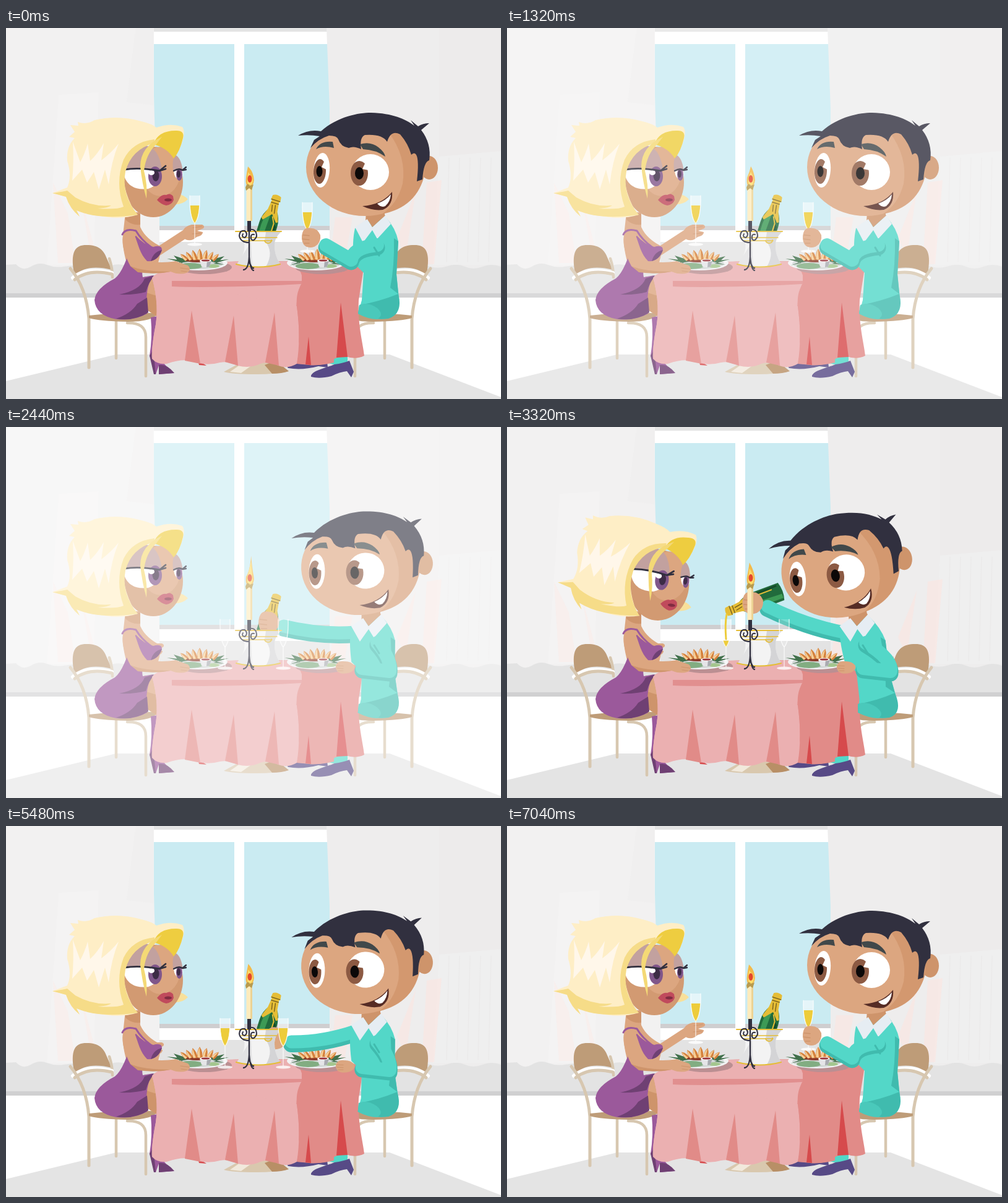
Recreate the animation shown at these times as an HTML page with a canvas. Size 800 px wide and 600 px high, loop 7080 ms.

```html
<!DOCTYPE html>
<html lang="en">
<head>
<meta charset="utf-8">
<title>Dinner for two</title>
<style>
html, body { margin: 0; width: 100%; height: 100%; overflow: hidden; background: #fff; }
canvas { display: block; width: 800px; height: 600px; }
</style>
</head>
<body>
<canvas id="stage" width="800" height="600"></canvas>
<script>
const ctx = document.getElementById('stage').getContext('2d');
const LOOP = 7080, CUT = 2020;
const SKIN = '#dca680', TAN = '#ce946b', TEAL = '#53d7c8', TEAL2 = '#40bbae';
const PLUM = '#9b599b', PLUM2 = '#6f4073', INK = '#31303f', GOLD = '#e5bd36';

const cache = {};
const path = d => cache[d] || (cache[d] = new Path2D(d));
function fill(d, color) { ctx.fillStyle = color; ctx.fill(path(d)); }
function line(d, color, w) {
  ctx.strokeStyle = color; ctx.lineWidth = w;
  ctx.lineCap = ctx.lineJoin = 'round';
  ctx.stroke(path(d));
}
function oval(x, y, rx, ry, color, rot = 0) {
  ctx.fillStyle = color;
  ctx.beginPath(); ctx.ellipse(x, y, rx, ry, rot, 0, 7); ctx.fill();
}
function box(x, y, w, h, color) { ctx.fillStyle = color; ctx.fillRect(x, y, w, h); }
function group(fn) { ctx.save(); fn(); ctx.restore(); }
function pivot(x, y, dx, dy, rot) {
  ctx.translate(x + dx, y + dy); ctx.rotate(rot); ctx.translate(-x, -y);
}
const clamp = v => Math.max(0, Math.min(1, v));
// Eased keyframes: each key is [time, ...values]
function track(t, keys) {
  let i = 0;
  while (i < keys.length - 1 && keys[i + 1][0] <= t) i++;
  const a = keys[i], b = keys[i + 1] || a;
  let k = b === a ? 0 : (t - a[0]) / (b[0] - a[0]);
  k = k * k * (3 - 2 * k);
  return a.slice(1).map((v, n) => v + (b[n + 1] - v) * k);
}

function room() {
  box(0, 0, 800, 600, '#fff');
  box(0, 0, 800, 430, '#e3e3e3');
  box(238, 0, 286, 6, '#e4e4e4');
  box(238, 6, 286, 340, '#fff');
  box(238, 26, 131, 294, '#caebf2');
  box(385, 26, 140, 294, '#caebf2');
  box(238, 320, 131, 7, '#cfced0'); box(385, 320, 140, 7, '#cfced0');
  fill('M0,0H239V110Q242,230 248,300V387Q235,380 222,385T196,385T170,384T144,386T118,384T92,386T66,383T40,386T16,382L0,383Z', '#f2f1f1');
  fill('M518,0H800V386Q785,380 770,386T742,386T714,385T686,386T658,384T630,386T602,385T574,386T546,385L523,386V130Z', '#eeeded');
  fill('M210,0L195,120L238,125V0Z', 'rgba(236,235,235,.35)');
  fill('M85,108L150,104L142,383H66Z', 'rgba(255,255,255,.12)');
  fill('M76,250L100,300L112,380H84Z M120,270L140,383H150Z', 'rgba(255,228,222,.35)');
  fill('M700,0H800V205L700,209Z', 'rgba(228,226,224,.2)');
  fill('M700,208L800,199V383H690Z', 'rgba(240,240,240,.9)');
  fill('M680,250L704,246L692,382H672Z M632,340L662,265L646,370Z M532,306H560L546,383H523Z', 'rgba(255,228,222,.5)');
  for (let x = 716; x < 800; x += 17) line(`M${x},210L${x - 4},378`, '#ebeaea', 1.5);
  box(0, 429, 800, 7, '#d0d0d1');
  fill('M0,571L178,528H620L800,597V600H0Z', '#e4e4e4');
}

function chair() {
  const c = '#d7c7b0', b = '#be9c78';
  fill('M109,391C105,361 112,351 130,351C150,351 158,359 163,373L171,391Q130,381 112,400Z', b);
  line('M167,373Q172,388 172,403', c, 4.5);
  line('M108,404Q131,385 171,396', '#fff', 6);
  line('M111,407Q133,389 171,398', c, 5);
  line('M104,389Q130,420 134,470V549', c, 5);
  line('M178,474V534', c, 4.5);
  line('M196,477Q226,476 226,500V563', c, 4.5);
  fill('M134,465Q180,460 246,461Q238,475 196,475Q150,474 134,469Z', b);
}

function womanBody(hand) {
  const [hx, hy] = hand;
  line(`M242,364L${hx - 12},${hy + 4}`, SKIN, 14);
  group(() => {
    ctx.translate(hx, hy);
    fill('M-16,2Q-12,-10 0,-12L17,-12Q22,-10 19,-6L9,-2L18,0Q19,5 8,8Q0,16 -10,12Z', SKIN);
    line('M2,-7L16,-9M1,3L15,2', TAN, 1.2);
  });
  fill('M193,298H216L217,322Q226,342 252,354L246,380H195Q186,350 190,326Z', SKIN);
  fill('M193,300H217V318Q204,320 193,310Z', TAN);
  fill('M224,402L246,402V468L228,456Z', SKIN);
  fill('M227,428L246,434V468L228,456Z', TAN);
  fill('M234,468L250,465L246,530Q256,546 272,558L247,560L247,546L242,560H239L238,545L232,530Q237,500 234,468Z', PLUM);
  fill('M247,545Q260,543 272,558L247,560Z M232,530L238,520L242,560H239Z', PLUM2);
  fill('M210,336Q222,350 238,354Q252,350 252,359Q247,374 234,377L222,379Q219,395 221,403L238,400Q224,418 228,462Q206,474 178,471Q145,465 143,440Q145,421 176,405Q192,392 205,340Z', PLUM);
  fill('M178,470Q202,462 212,446L228,436L230,460Q207,475 178,470Z', PLUM2);
  fill('M240,400L224,405Q217,424 183,431Q208,432 226,427Q230,412 240,400Z', PLUM2);
  fill('M252,359Q247,374 234,377Q238,362 252,359Z', PLUM2);
  line('M188,334Q193,323 210,328Q218,342 234,354', PLUM, 3);
}

function womanArm() {
  fill('M189,336Q197,327 207,333C214,350 216,365 228,377Q252,381 274,377L294,384Q301,391 292,396Q280,400 266,394C242,399 213,397 201,385C193,370 186,350 189,336Z', SKIN);
  fill('M201,385Q222,394 266,394Q242,399 213,395Z', TAN);
  line('M282,388L296,390M283,393L292,394', TAN, 1.2);
}

function womanHead(pose, shut) {
  group(() => {
    pivot(185, 225, pose[0], pose[1], pose[2]);
    fill('M276,268Q288,270 294,277Q284,287 268,285Z', '#f8e09a');
    oval(238, 249, 48, 57, '#d29a72');
    oval(250, 232, 32, 40, SKIN);
    fill('M193,230Q195,198 222,190Q246,190 252,228Z', '#c2a19f');
    fill('M270,230Q268,208 275,206Q284,212 286,234Z', '#c2a19f');
    if (shut) {
      oval(222, 229, 31, 37, '#c2a19f');
      oval(281, 230, 6, 24, '#c2a19f');
      line('M195,261Q222,268 250,255L256,252', INK, 2.8);
      line('M277,248L287,247', INK, 2.2);
    } else {
      fill('M191,230Q220,226 250,231Q252,252 230,260Q200,264 191,240Z', '#fff');
      oval(241, 240, 11, 16, '#80568a');
      oval(242, 239, 5.5, 9, '#3d2c46');
      oval(235, 234, 5, 4, '#fff');
      line('M191,229Q215,225 248,231L258,223M248,231L258,228', INK, 2.8);
      fill('M271,231L285,229Q288,240 281,246Q272,244 271,231Z', '#fff');
      oval(280, 237, 5, 10, '#80568a'); oval(279, 236, 3, 6, '#3d2c46');
      line('M271,231Q280,226 285,230L291,225M285,230L291,229', INK, 2.3);
    }
    fill('M244,278Q252,268 259,270Q265,266 270,272L271,278Q268,286 259,287Q250,285 244,278Z', '#c04a5c');
    oval(262, 278, 6, 2.5, '#812c41');
    fill('M75,267L99,258Q107,240 99,215Q97,192 111,178L102,176L111,168L104,157L117,158L116,152Q130,157 143,149Q182,140 219,151Q236,155 243,161Q266,153 285,160Q292,170 280,196Q272,212 270,206Q258,190 236,186Q204,193 193,223Q184,255 208,297L213,302Q190,309 165,306Q138,303 114,295L119,305Q103,292 97,273Z', '#feeec6');
    fill('M240,180Q204,184 190,213Q176,250 190,289Q180,294 148,292Q165,291 170,287Q140,290 112,274L99,263Q84,266 75,267L97,273Q103,292 119,305L114,295Q150,311 213,302Q186,270 193,232Q203,196 240,186Z', '#f6dc88');
    fill('M238,188Q246,166 274,166Q289,165 286,178Q281,200 271,211Q261,194 238,188Z', '#eecd40');
    fill('M107,247Q110,215 108,184L120,217Q127,204 132,187L136,215Q148,204 158,186L154,214Q170,202 182,187Q170,216 166,253L160,229L150,261L142,233L131,250L123,229Z', '#fff7ea');
    fill('M252,176Q217,192 217,224Q220,252 227,276Q229,254 223,231Q226,204 243,188Z', '#f4d976');
  });
}

function table() {
  fill('M352,556L385,538H436L457,555Q436,560 405,560Q365,560 352,556Z', '#d9c8ae');
  fill('M362,556L388,538L398,545L380,558Z', '#f1e9dc');
  fill('M418,545L436,538L457,555Q446,559 430,559Z', '#b88f66');
  fill('M453,546Q475,538 500,538L519,540L520,549L505,547Q478,554 456,550Z', '#574a86');
  fill('M520,532H552V543Q535,548 519,541Z', TEAL);
  fill('M493,562C497,553 517,550 531,544Q545,542 555,538L562,556L558,565L551,555Q540,556 526,563Q506,568 493,564Z', '#574a86');
  fill('M310,537L324,546L312,545Z', '#d64a4c');
  const hem = 'Q245,545 260,543Q290,532 312,542Q328,546 346,541Q360,538 374,546Q395,551 411,543Q425,538 440,546Q455,552 470,543';
  fill('M270,388Q345,376 410,377L540,378L578,389L570,440C568,480 577,510 579,530Q565,537 549,531Q535,530 520,542Q500,547 490,545L470,543Z', '#e18b88');
  fill(`M236,404Q243,393 290,383Q345,376 410,377L470,378L478,400V412C465,435 468,490 475,515L470,543L236,535Q235,520 240,490Q249,450 236,404Z`, '#ebb0b1');
  fill(`M236,404Q249,450 240,490Q235,520 236,535${hem}Q477,500 470,450Z`, '#ebb0b1');
  fill('M470,543Q477,500 470,450Q468,425 480,412H530V541Q505,547 494,544Z', '#e18b88');
  fill('M268,409H478V414Q340,421 268,418Z', '#e18f8f');
  fill('M300,457L289,538L314,543Z M368,465L354,540L375,546Z M434,460L419,541L441,546Z', '#e18b88');
  fill('M489,499L484,544L493,545Z M541,444L534,533L552,532Z', '#d64a4c');
}

function plate(x) {
  oval(x + 10, 387, 44, 11, '#bb8f92');
  group(() => {
    ctx.translate(x, 380);
    oval(0, 0, 47, 12, '#f2f3f4');
    oval(0, 1, 40, 9, '#d2d7d6');
    fill('M-51,-7L-20,-4L-43,4L-25,0Z M49,-6L20,-3L42,3L24,1Z M-40,-12L-12,-3L-30,0Z M42,-11L14,-4L30,0Z', '#41704b');
    oval(-13, 5, 20, 5, '#82ad82'); oval(24, 5, 10, 3, '#a4c68e');
    oval(-2, -5, 20, 4, '#8c3b2b');
    for (let i = -3; i <= 3; i++) group(() => {
      ctx.translate(2 + i * 7, -5); ctx.rotate(i * .27);
      const s = 1 - Math.abs(i) * .08;
      ctx.scale(s, s);
      fill('M-3.5,0Q-5,-11 0,-18Q6,-9 4,1Z', '#d5813c');
      fill('M-3.5,-1Q-4,-10 0,-17Q0,-8 1,0Z', '#f6cf97');
    });
    fill('M2,-4H21L18,6Q12,8 5,6Z', '#e5e5e8');
    fill('M14,-4H21L18,6L13,7Z', '#a8aab0');
    oval(11.5, -4, 9, 2.5, '#fff'); oval(11.5, -4, 7, 1.6, '#98333a');
  });
}

function flute(x, y, level) {
  group(() => {
    ctx.translate(x, y);
    fill('M-8,-79H8Q9,-45 1,-34H-1Q-9,-45 -8,-79Z', level ? 'rgba(255,255,255,.5)' : 'rgba(255,255,255,.2)');
    if (level > 0) group(() => {
      ctx.beginPath(); ctx.rect(-9, -35 - 28 * level, 18, 30 * level + 2); ctx.clip();
      fill('M-8,-79H8Q8,-45 1,-34H-1Q-8,-45 -8,-79Z', '#edcc3b');
    });
    line('M-8,-79Q-9,-45 0,-34V-2M8,-79Q9,-45 0,-34', 'rgba(255,255,255,.85)', 1.2);
    oval(0, 0, 12, 2.4, 'rgba(255,255,255,.8)');
  });
}

function bottle([x, y, rot]) {
  group(() => {
    ctx.translate(x, y); ctx.rotate(rot);
    fill('M-5,8H5L6,22Q15,34 15,48V94Q0,99 -15,94V48Q-15,34 -6,22Z', '#216b3c');
    fill('M-1,28Q-11,36 -11,50V94H-4Z', '#3c9a55');
    fill('M8,44L13,48V90H10Z', '#164d2b');
    fill('M-7,0Q0,-4 7,0L8,8H6L8,24L14,40L11,42L1,30L-11,43L-14,40L-8,24L-6,8H-8Z', GOLD);
    line('M3,34L8,44V80', GOLD, 2);
    line('M-7,7H7M-6,12H6M-3,16L-1,26M2,15L4,28', '#6f5a1c', 1.3);
  });
}

function bucket() {
  fill('M373,328H444Q434,340 434,350Q433,366 443,382Q408,391 373,382Q388,364 385,347Q383,337 373,328Z', '#f3f3f3');
  fill('M420,330H444Q434,340 434,350Q433,366 443,382L420,386Q434,362 418,344Z', '#d4d4d6');
  fill('M373,382L396,346L398,386Z', '#e2e2e3');
  line('M371,329H445', GOLD, 2);
  line('M380,339H438M383,344H430', GOLD, 1.5);
  line('M372,382Q408,391 443,382', GOLD, 2.2);
  line('M418,344A5,4 0 1 0 429,343', GOLD, 1.8);
}

function candle(t) {
  const w = 2 * Math.PI * t / LOOP;
  const tx = 394 - 3 * Math.cos(w * 4), ty = 221 + 3 * Math.cos(w * 5) - 12 * Math.exp(-(((t - 2440) / 160) ** 2));
  fill(`M${tx},${ty}Q${tx - 2},233 388,242Q386,256 394,258Q403,252 400,240Q398,230 ${tx},${ty}Z`, '#f3ba4a');
  fill(`M${tx},${ty + 9}Q391,238 390,244Q389,255 395,256Q401,249 398,241Z`, '#fbdc6d');
  oval(394, 244, 3.5, 6, '#e4482c');
  box(388.5, 258, 9, 54, '#fdebbc');
  box(395, 258, 3, 54, '#ecd394');
  fill('M387,258Q390,249 394,255L400,253L397,262L393,259L388,263Z', '#b99b4e');
  box(390, 312, 6, 17, INK);
  line('M393,328V379M393,370Q392,390 384,391M393,370Q395,392 400,392M393,378Q398,391 400,388', INK, 2.3);
  line('M393,347Q379,347 377,336Q378,326 386,328Q392,334 386,339Q380,338 383,333', INK, 2);
  line('M393,326Q405,324 405,337Q400,347 396,341Q395,332 401,334', INK, 2);
}

function fist(x, y, w, h) {
  group(() => {
    ctx.translate(x, y); ctx.scale(w, h);
    fill('M-14,-6Q-11,-15 0,-13Q10,-13 15,-3Q17,8 6,14Q-6,18 -12,11Q-17,3 -14,-6Z', SKIN);
    line('M-13,-3L-3,-2M-13,3L-3,4M-11,9L-3,9', TAN, 1.4);
  });
}

function farArm(x, y, sx) {
  const wx = x + 24, wy = y + 8, mx = (wx + sx) / 2, my = (wy + 333) / 2 + 9;
  const d = o => `M${wx},${wy + o}Q${mx},${my + o} ${sx},${333 + o}`;
  line(d(3), TEAL2, 26);
  line(d(-1), TEAL, 21);
  fist(x, y, 1.1, 1.25);
}

function manTorso(s) {
  group(() => {
    ctx.transform(1, 0, -s / 145, 1, s * 470 / 145, 0);
    fill('M582,296H612V330H580Z', TAN);
    fill('M564,324L585,313L614,306Q630,324 634,345L631,398L635,436Q639,466 615,470Q590,473 569,462L575,440L578,396L562,380Q559,345 564,324Z', TEAL);
    fill('M571,448Q602,443 634,430Q642,462 618,470Q590,473 569,462Z', TEAL2);
    fill('M571,448Q585,442 600,453Q612,464 600,471Q585,471 569,462Z', '#4ac9bb');
    fill('M634,345L631,398L634,430L621,420Q628,385 627,340Z', TEAL2);
    fill('M564,322L584,309L592,322L613,303L622,317L600,341L592,327L577,347Z', '#e6edf3');
    fill('M584,309L592,322L613,303L608,298H584Z', TAN);
  });
}

function nearArm([x, y, ex, ey, sx, sy, flat], lean) {
  const dx = ex - x, dy = ey - y, n = Math.hypot(dx, dy);
  const wx = x + dx / n * 28, wy = y + dy / n * 28;
  const d = o => `M${sx + lean},${sy + o}Q${ex + 3},${ey - 20 + o} ${ex},${ey + o}L${wx},${wy + o}`;
  fist(x, y, 1, flat);
  line(d(3), TEAL2, 25);
  line(d(-1), TEAL, 22);
  line(`M${sx + lean - 5},${sy + 3}L${sx + lean + 3},${sy + 16}`, TEAL2, 3);
}

function manHead([dx, dy, rot]) {
  group(() => {
    pivot(580, 225, dx, dy, rot);
    oval(684, 226, 14, 19, TAN);
    oval(580, 225, 95, 79, SKIN);
    fill('M618,168Q648,208 641,252Q632,286 607,301Q665,290 677,235L670,190Q645,160 618,168Z', '#d3986f');
    fill('M472,174Q490,163 509,167C536,143 570,137 590,137C625,138 645,147 660,158L654,149L666,159Q674,154 684,154L671,165Q688,187 684,214Q675,216 673,245L664,248Q668,214 663,205Q660,200 655,205Q650,187 637,172Q622,164 616,184Q608,171 580,173Q571,177 574,196Q562,190 554,194Q541,192 537,180Q535,174 522,174Q505,179 492,194L498,181L507,175Q490,172 472,174Z', INK);
    fill('M501,196Q508,182 528,184L530,194Q513,189 501,196Z M572,188Q589,183 602,193Q612,201 613,208Q598,197 577,196Z', '#41484a');
    oval(510, 230, 13, 28, '#fff', .08);
    oval(507, 232, 10, 20, '#8c5a43', .05);
    oval(506.5, 232, 5, 9, '#0b0808');
    fill('M510,225L516,212L518,229Z', '#fff');
    oval(589, 233, 30, 29, '#fff');
    oval(571, 235, 14, 20, '#8c5a43');
    oval(571, 235, 7, 10, '#0b0808');
    fill('M576,228L582,215L586,230Z', '#fff');
    fill('M576,288Q607,286 624,265Q626,287 609,294Q593,296 576,288Z', '#562c25');
    fill('M600,284Q614,279 622,269Q621,281 613,288Q606,291 600,284Z', '#fff');
  });
}

// Near arm: hand, elbow, shoulder, hand height
const TOAST = [493, 338, 558, 376, 600, 352, 1.1];
const REST = [548, 388, 620, 396, 606, 350, .7];
const GRAB = [455, 366, 556, 382, 602, 350, 1];

function draw(t) {
  const cheers = track(t, [[0, 0], [560, 1], [1120, 0], [6320, 0], [6680, 1], [7040, 0]])[0];
  const man = track(t, [[0, 0, 0, 0, 0], [CUT, 0, 0, 0, 0], [CUT, -8, 0, -.055, -6], [2600, -8, 0, -.055, -6],
    [3240, -42, 4, -.17, -26], [3520, -42, 4, -.17, -26], [4200, 7, 1, -.06, 4], [4600, 11, 1, -.04, 6],
    [4880, 11, 1, -.04, 6], [5400, -8, 0, -.055, -6], [5640, -8, 0, -.055, -6], [6280, 0, 0, 0, 0]]);
  const woman = track(t, [[0, 0, 0, 0], [2700, 0, 0, 0], [3240, 12, 0, .14], [3560, 12, 0, .14],
    [4280, 7, 0, .065], [5000, 0, 0, 0]]);
  [-6, 1, -.03, -5].forEach((v, i) => man[i] += v * cheers);
  woman[0] += 4 * cheers; woman[2] += .04 * cheers;
  const flask = track(t, [[0, 438, 272, .3], [2500, 438, 272, .3], [2860, 425, 236, -.4], [3200, 355, 299, -1.93],
    [3640, 355, 299, -1.93], [4280, 435, 265, -1.277], [4520, 449, 302, -1.93], [4900, 449, 302, -1.93],
    [5120, 446, 236, -.4], [5360, 438, 272, .3]]);
  const near = track(t, [[0, ...TOAST], [CUT, ...TOAST], [CUT, ...REST], [5520, ...REST], [5880, ...GRAB], [6300, ...TOAST]]);
  const hers = track(t, [[0, 300, 330], [CUT, 300, 330], [CUT, 235, 362], [5480, 235, 362], [5880, 349, 370], [6300, 300, 330]]);
  near[0] -= 12 * cheers; near[1] -= 5 * cheers;
  hers[0] += 12 * cheers; hers[1] -= 5 * cheers;
  const held = t < CUT || t > 5880;
  const pour = (a, b) => held ? 1 : clamp((t - a) / (b - a));

  room();
  chair();
  group(() => { ctx.translate(790, 0); ctx.scale(-1, 1); chair(); });
  womanBody(hers);
  table();
  plate(311);
  plate(501);

  bottle(flask);
  if (t > CUT && t < 5720) {
    const grip = [flask[0] - 45 * Math.sin(flask[2]), flask[1] + 45 * Math.cos(flask[2])];
    const hand = t < 5360 ? grip : track(t, [[5360, 425, 315], [5480, 437, 342], [5720, 560, 350]]);
    farArm(hand[0], hand[1], 570 + man[3]);
  }
  bucket();
  const hisCup = held ? [near[0] - 6, near[1] + 23] : [448, 390];
  const herCup = held ? [hers[0] + 5, hers[1] + 20] : [354, 390];
  flute(...herCup, pour(3160, 3640));
  flute(...hisCup, pour(4500, 4900));
  if (t > 3190 && t < 3640) line('M355,303Q352,318 354,343', '#edcc3b', 3);
  if (t > 4520 && t < 4900) line('M449,306Q447,320 448,343', '#edcc3b', 3);
  candle(t);

  womanArm();
  womanHead(woman, t >= 4200 && t < 4400);
  manTorso(man[3]);
  nearArm(near, man[3]);
  manHead(man);

  const veil = t < CUT ? clamp((t - 1180) / 740) : 1 - clamp((t - 2100) / 550);
  if (veil > 0) box(0, 0, 800, 600, `rgba(255,255,255,${veil})`);
}

const start = performance.now();
function frame(now) {
  draw(Math.max(0, now - start) % LOOP);
  requestAnimationFrame(frame);
}
draw(0);
requestAnimationFrame(frame);
</script>
</body>
</html>
```
